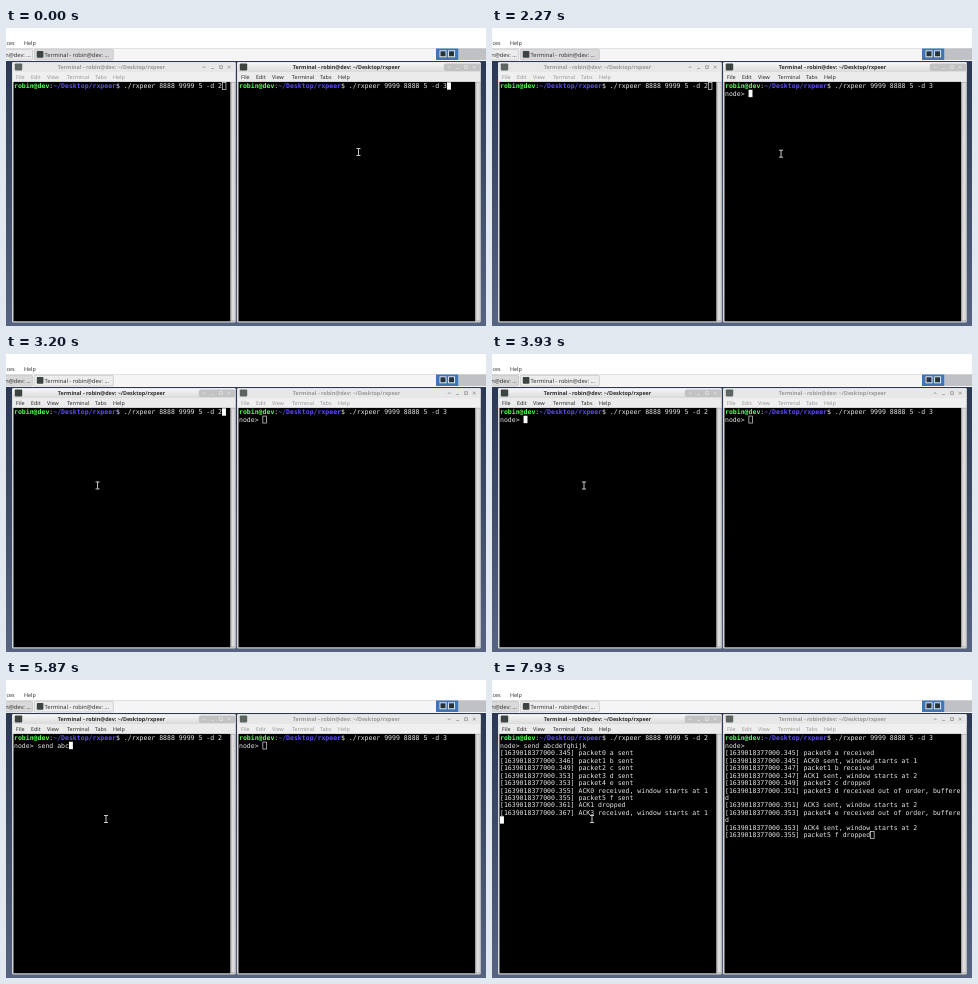
Animation of 480x298 px, one loop 8 s. Source, as an HTML page:

```html
<!DOCTYPE html>
<html lang="en">
<head>
<meta charset="utf-8">
<title>Two terminals</title>
<style>
html, body { margin: 0; width: 480px; height: 298px; overflow: hidden; background: #fff; }
svg { display: block; }
text { white-space: pre; text-rendering: geometricPrecision; font: 5.4px "Noto Sans", "Open Sans", sans-serif; }
.panel { font-size: 5.7px; }
.title { font-weight: 700; text-anchor: middle; }
.mono { font: 6.52px "DejaVu Sans Mono", monospace; fill: #e6e6e6; }
.user { font-weight: 700; fill: #55ff55; }
.path { font-weight: 700; fill: #5c50f2; }
</style>
</head>
<body>
<svg id="stage" width="480" height="298" viewBox="0 0 480 298"></svg>
<script>
const LOOP = 8000, COL = 3.925, ROW = 7.45;
const USER = 'robin@dev', DIR = '~/Desktop/rxpeer';
const stage = document.getElementById('stage');

// Moments of the hard changes
const RIGHT_ENTER = 1930, FOCUS_LEFT = 3200, LEFT_ENTER = 3600, SEND = 7830;
const COMMAND = 'send abcdefghijk';
const KEYS = [4330, 4460, 4600, 4740, 4930, 5200, 5430, 5680,
              6100, 6330, 6560, 6720, 6900, 7250, 7420, 7600];
const MOUSE = [[0, 352.5, 124], [2080, 352.5, 124], [2680, 87.5, 131], [3000, 87.5, 131],
               [3250, 92, 131.5], [4950, 92, 131.5], [5300, 100, 139], [LOOP, 100, 139]];

const stamp = rows => rows.map(([ms, msg]) => `[1639018377000.${ms}] ${msg}`);
const LEFT_LOG = stamp([
  [345, 'packet0 a sent'], [346, 'packet1 b sent'], [349, 'packet2 c sent'],
  [353, 'packet3 d sent'], [353, 'packet4 e sent'],
  [355, 'ACK0 received, window starts at 1'], [355, 'packet5 f sent'],
  [361, 'ACK1 dropped'], [367, 'ACK3 received, window starts at 1']]);
const RIGHT_LOG = stamp([
  [345, 'packet0 a received'], [345, 'ACK0 sent, window starts at 1'],
  [347, 'packet1 b received'], [347, 'ACK1 sent, window starts at 2'],
  [349, 'packet2 c dropped'], [351, 'packet3 d received out of order, buffered'],
  [351, 'ACK3 sent, window starts at 2'], [353, 'packet4 e received out of order, buffered'],
  [353, 'ACK4 sent, window starts at 2'], [355, 'packet5 f dropped']]);

const rect = (x, y, w, h, fill, more = '') =>
  `<rect x="${x}" y="${y}" width="${w}" height="${h}" fill="${fill}" ${more}/>`;
const label = (x, y, str, fill = '#333', cls = '') =>
  `<text x="${x}" y="${y}" fill="${fill}" class="${cls}">${str}</text>`;
const line = (d, color, width = .7) =>
  `<path d="${d}" fill="none" stroke="${color}" stroke-width="${width}"/>`;

function wrap(rows, cols) {
  return rows.flatMap(row => row.match(new RegExp(`.{1,${cols}}`, 'g')));
}

function terminal(x, rows, focused) {
  const y = 60.4;
  let out = `<text class="mono" x="${x}" y="${y}"><tspan class="user">${USER}</tspan>:` +
    `<tspan class="path">${DIR}</tspan>$ ${rows[0]}</text>`;
  rows.slice(1).forEach((row, i) => out += label(x, y + (i + 1) * ROW, row, '', 'mono'));
  const last = rows.length - 1;
  const prefix = last ? 0 : USER.length + DIR.length + 3;
  const cx = x + (prefix + rows[last].length) * COL, cy = 54.3 + last * ROW;
  return out + (focused ? rect(cx, cy, COL, 7.4, '#fff')
    : rect(cx + .3, cy + .3, COL - .3, 7, 'none', 'stroke="#ddd" stroke-width=".7"'));
}

function titleButtons(x, focused) {
  const back = focused ? rect(x - 5, 35.5, 37, 7.5, '#c2c2c2', 'rx="2"') : '';
  return back + line(`M${x - 1} 40l1.3-1.5 1.3 1.5M${x + 7.5} 40.5h2.6` +
    `M${x + 15.8} 37.7h2.8v2.8h-2.8zM${x + 24} 37.7l2.8 2.8m0-2.8l-2.8 2.8`,
    focused ? '#e6e6e6' : '#888');
}

function win(x, w, inner, titleX, rows, focused) {
  const ink = focused ? '#2b2b2b' : '#999';
  const menu = [['File', 4], ['Edit', 19], ['View', 35], ['Terminal', 55], ['Tabs', 83], ['Help', 101]];
  const bar = x + 1.5 + inner;
  return rect(x, 34, w, 260.5, '#d6d6d6', 'rx="1.5"') +
    rect(x + .5, 34.5, w - 1, 19.4, focused ? '#ebebeb' : '#efefef') +
    rect(x + .5, 34.5, w - 1, 9.5, focused ? 'url(#bar)' : '#e7e7e7') +
    rect(x + 2.8, 35.4, 7.4, 7, focused ? '#3c4440' : '#5d6561', 'rx=".8"') +
    label(titleX, 41, `Terminal - ${USER}: ${DIR}`, ink, 'title') +
    titleButtons(x + w - 32, focused) +
    menu.map(([name, dx]) => label(x + dx, 50.8, name, ink)).join('') +
    rect(x + 1.5, 53.9, inner, 239.4, '#000') +
    rect(bar, 53.9, w - inner - 2, 239.4, '#a8a8a8') +
    rect(bar + 1, 54.5, w - inner - 3.5, 238, '#dcdcdc') +
    terminal(x + 2, rows, focused);
}

function panel(leftFocused) {
  const button = (x, w, on) =>
    rect(x, 21.3, w, 10.7, on ? '#d9d9d9' : '#ececec', 'stroke="#bbb" stroke-width=".6" rx="1"');
  const mini = x => rect(x, 22.8, 6, 6, '#26323a', 'stroke="#eef3f7" stroke-width=".9"');
  return rect(0, 0, 480, 33, '#fff') +
    label(-1, 17, 'ices') + label(18, 17, 'Help') +
    rect(0, 20, 480, 12.8, '#f5f5f5') + rect(0, 20, 480, .6, '#d2d2d2') +
    button(-3, 29.5, leftFocused) + label(-.8, 28.6, `${USER.slice(-5)}: ...`, '#333', 'panel') +
    button(28.3, 79, !leftFocused) +
    rect(30.8, 23, 6.6, 6.7, '#3c4440', 'rx=".8"') +
    label(38.6, 28.6, `Terminal - ${USER}: ...`, '#333', 'panel') +
    rect(430, 20.5, 22.5, 11.5, '#3f74b5') + mini(434) + mini(442.6) +
    rect(453, 20.5, 27, 11.5, '#bfc1c4');
}

function pointer(t) {
  const i = MOUSE.findIndex(([at]) => at > t);
  const [t0, x0, y0] = MOUSE[i - 1], [t1, x1, y1] = MOUSE[i];
  const p = (t - t0) / (t1 - t0), e = p * p * (3 - 2 * p);
  const x = x0 + (x1 - x0) * e, y = y0 + (y1 - y0) * e;
  return line(`M${x - 2} ${y - 3.5}h4m-2 0v7m-2 0h4`, '#c8c8c8', 1);
}

function scene(t) {
  const leftFocused = t >= FOCUS_LEFT;
  const left = ['./rxpeer 8888 9999 5 -d 2'], right = ['./rxpeer 9999 8888 5 -d 3'];
  if (t >= LEFT_ENTER) left.push('node> ' + COMMAND.slice(0, KEYS.filter(k => k <= t).length));
  if (t >= RIGHT_ENTER) right.push('node> ');
  if (t >= SEND) {
    left.push(...LEFT_LOG, '');
    right.push(...wrap(RIGHT_LOG, 60));
  }
  return `<defs>
    <linearGradient id="sky" x2="0" y2="1"><stop stop-color="#2b3853"/><stop offset="1" stop-color="#566481"/></linearGradient>
    <linearGradient id="bar" x2="0" y2="1"><stop stop-color="#f6f6f6"/><stop offset="1" stop-color="#dadada"/></linearGradient>
    </defs>` +
    rect(0, 32, 480, 266, 'url(#sky)') + panel(leftFocused) +
    win(6, 223.8, 217, 105.5, left, leftFocused) +
    win(231, 243.8, 236.8, 340.5, right, !leftFocused) +
    pointer(t);
}

let shown = '';
function frame(now) {
  const next = scene(now % LOOP);
  if (next !== shown) stage.innerHTML = shown = next;
  requestAnimationFrame(frame);
}
frame(0);
</script>
</body>
</html>
```
